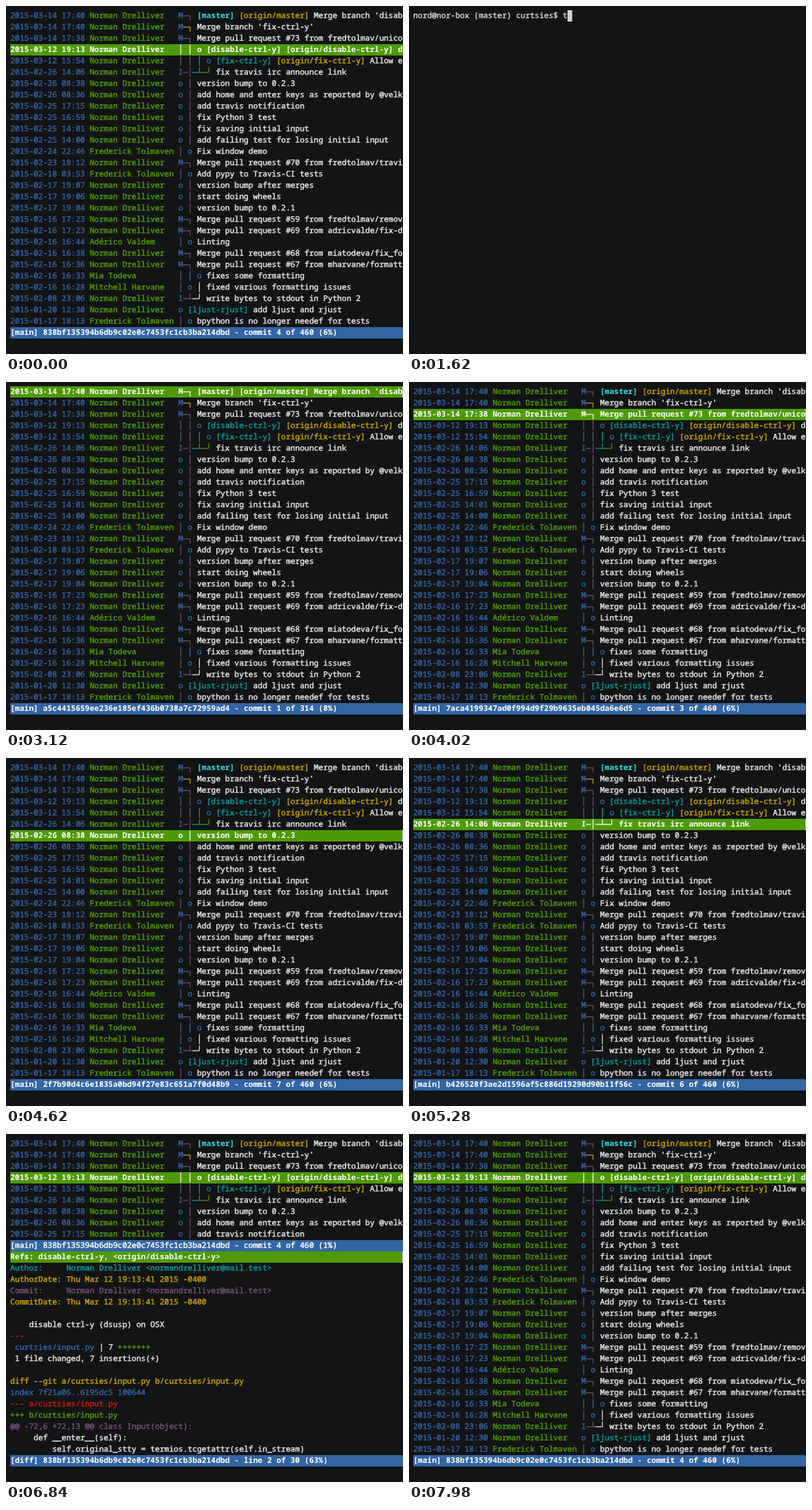
An HTML page for the animation above (8000 ms loop, 561 by 492 pixels).

```html
<!DOCTYPE html>
<html lang="en">
<head>
<meta charset="utf-8">
<title>Terminal log viewer</title>
<style>
  html, body { margin: 0; width: 561px; height: 492px; overflow: hidden; background: #121415; }
  svg { display: block; background: #121415; }
  text {
    font: 400 11px "Noto Sans Mono", "DejaVu Sans Mono", monospace;
    white-space: pre; text-rendering: geometricPrecision;
    fill: currentColor; stroke: currentColor; stroke-width: .45px;
  }
  text.bold { font-weight: 700; stroke: none; }
  path { fill: none; stroke: currentColor; stroke-width: 1.2px; }
</style>
</head>
<body>
<svg id="screen" width="561" height="492" viewBox="0 0 561 492"></svg>
<script>
const LOOP = 8000, CW = 6.6, RH = 16, LEFT = 6, TOP = 6, COLS = 84;
const COLOR = {
  b: '#3465a4', g: '#4e9a06', y: '#c9a100', c: '#06989a', m: '#75507b',
  r: '#cc1a0a', w: '#e6e6e4', W: '#ffffff', C: '#34e2e2', p: '#d3d3d0'
};

const ND = 'Norman Drelliver', FT = 'Frederick Tolmaven';
// date, author, graph, graph colours, subject
const LOG = [
  ['2015-03-14 17:40', ND, 'M─┐', 'bmm', "[master] [origin/master] Merge branch 'disable"],
  ['2015-03-14 17:40', ND, 'M─┐', 'byy', "Merge branch 'fix-ctrl-y'"],
  ['2015-03-14 17:38', ND, 'M─┐', 'bmm', 'Merge pull request #73 from fredtolmav/unico'],
  ['2015-03-12 19:13', ND, '│ │ o', 'm m b', '[disable-ctrl-y] [origin/disable-ctrl-y] d'],
  ['2015-03-12 15:54', ND, '│ │ │ o', 'm m c b', '[fix-ctrl-y] [origin/fix-ctrl-y] Allow e'],
  ['2015-02-26 14:06', ND, 'I─│─┴─┘', 'bmmccgg', 'fix travis irc announce link'],
  ['2015-02-26 08:38', ND, 'o │', 'b m', 'version bump to 0.2.3'],
  ['2015-02-26 08:36', ND, 'o │', 'b m', 'add home and enter keys as reported by @velk'],
  ['2015-02-25 17:15', ND, 'o │', 'b m', 'add travis notification'],
  ['2015-02-25 16:59', ND, 'o │', 'b m', 'fix Python 3 test'],
  ['2015-02-25 14:01', ND, 'o │', 'b m', 'fix saving initial input'],
  ['2015-02-25 14:00', ND, 'o │', 'b m', 'add failing test for losing initial input'],
  ['2015-02-24 22:46', FT, '│ o', 'm b', 'Fix window demo'],
  ['2015-02-23 18:12', ND, 'M─┐', 'bmm', 'Merge pull request #70 from fredtolmav/travi'],
  ['2015-02-18 03:53', FT, '│ o', 'm b', 'Add pypy to Travis-CI tests'],
  ['2015-02-17 19:07', ND, 'o │', 'b m', 'version bump after merges'],
  ['2015-02-17 19:06', ND, 'o │', 'b m', 'start doing wheels'],
  ['2015-02-17 19:04', ND, 'o │', 'b m', 'version bump to 0.2.1'],
  ['2015-02-16 17:23', ND, 'M─┐', 'bmm', 'Merge pull request #59 from fredtolmav/remov'],
  ['2015-02-16 17:23', ND, 'M─┐', 'bmm', 'Merge pull request #69 from adricvalde/fix-d'],
  ['2015-02-16 16:44', 'Adérico Valdem', '│ o', 'm b', 'Linting'],
  ['2015-02-16 16:38', ND, 'M─┐', 'bmm', 'Merge pull request #68 from miatodeva/fix_fo'],
  ['2015-02-16 16:36', ND, 'M─┐', 'bmm', 'Merge pull request #67 from mharvane/formatt'],
  ['2015-02-16 16:33', 'Mia Todeva', '│ │ o', 'm b b', 'fixes some formatting'],
  ['2015-02-16 16:28', 'Mitchell Harvane', '│ o │', 'm b w', 'fixed various formatting issues'],
  ['2015-02-08 23:06', ND, 'I─┴─┘', 'bmmww', 'write bytes to stdout in Python 2'],
  ['2015-01-20 12:30', ND, 'o', 'b', '[ljust-rjust] add ljust and rjust'],
  ['2015-01-17 18:13', FT, '│ o', 'm b', 'bpython is no longer needef for tests']
];

const HASH = [
  'a5c4415659ee236e185ef436b0738a7c72959ad4',
  '5d0e82b7c19f4a63e7d2086bb94f1c35a80e72d6',
  '7aca4199347ad0f994d9f29b9635eb045da6e6d5',
  '838bf135394b6db9c02e0c7453fc1cb3ba214dbd',
  'e19c04a7d3528fb60a4e97c12db5f8367049ca8e',
  'b426528f3ae2d1596af5c886d19290d90b11f56c',
  '2f7b90d4c6e1835a0bd94f27e83c651a7f0d48b9',
  'c60a3e95f1d7482b6e09d5a3187cf42b90e6d713'
];

const MAIL = ND + ' <normandrelliver@mail.test>';
// runs of colour, column, text
const DIFF = [
  [['W', 0, 'Refs: disable-ctrl-y, <origin/disable-ctrl-y>', true]],
  [['c', 0, 'Author:     ' + MAIL]],
  [['y', 0, 'AuthorDate: Thu Mar 12 19:13:41 2015 -0400']],
  [['m', 0, 'Commit:     ' + MAIL]],
  [['y', 0, 'CommitDate: Thu Mar 12 19:13:41 2015 -0400']],
  [],
  [['w', 4, 'disable ctrl-y (dsusp) on OSX']],
  [['r', 0, '---']],
  [['b', 1, 'curtsies/input.py'], ['w', 19, '| 7'], ['g', 23, '+++++++']],
  [['w', 1, '1 file changed, 7 insertions(+)']],
  [],
  [['y', 0, 'diff --git a/curtsies/input.py b/curtsies/input.py']],
  [['b', 0, 'index 7f21a06..6195dc5 100644']],
  [['r', 0, '--- a/curtsies/input.py']],
  [['g', 0, '+++ b/curtsies/input.py']],
  [['m', 0, '@@ -72,6 +72,13 @@ class Input(object):']],
  [['w', 5, 'def __enter__(self):']],
  [['w', 9, 'self.original_stty = termios.tcgetattr(self.in_stream)']]
];

const colX = col => LEFT + col * CW;
const rowY = row => TOP + row * RH;
const esc = s => s.replace(/&/g, '&amp;').replace(/</g, '&lt;');

function text(row, col, s, color, bold) {
  return `<text x="${colX(col).toFixed(1)}" y="${rowY(row) + 11}" color="${COLOR[color]}"` +
    `${bold ? ' class="bold"' : ''}>${esc(s.slice(0, COLS - col))}</text>`;
}

const bar = (row, color) =>
  `<rect x="${LEFT}" y="${rowY(row)}" width="555" height="${RH}" fill="${COLOR[color]}"/>`;

const block = (row, col) =>
  `<rect x="${Math.round(colX(col))}" y="${rowY(row)}" width="6.6" height="${RH}" fill="${COLOR.p}"/>`;

// Arms of each line-drawing character
const ARMS = { '│': 'NS', '─': 'EW', '┐': 'SW', '┘': 'NW', '┴': 'NEW' };

function line(row, col, ch, color) {
  const x = colX(col) + CW / 2, y = rowY(row) + 7.8;
  const end = { N: `V${y - 7.3}`, S: `V${y + 6.7}`, E: `H${colX(col + 1)}`, W: `H${colX(col)}` };
  const d = [...ARMS[ch]].map(arm => `M${x} ${y}${end[arm]}`).join('');
  return `<path d="${d}" color="${COLOR[color]}"/>`;
}

function commit(row, selected) {
  const [date, author, graph, tint, subject] = LOG[row];
  const pick = color => selected ? 'W' : color;
  let out = selected ? bar(row, 'g') : '';
  out += text(row, 0, date, pick('b'), selected) + text(row, 17, author, pick('g'), selected);
  [...graph].forEach((ch, i) => {
    if (ARMS[ch]) out += line(row, 36 + i, ch, pick(tint[i]));
    else if (ch !== ' ') out += text(row, 36 + i, ch, pick(tint[i]), selected);
  });
  let col = 37 + graph.length;
  for (const part of subject.split(/(\[[^\]]+\])/)) {
    const master = part === '[master]';
    const color = master ? 'C' : part.startsWith('[origin') ? 'y' : part[0] === '[' ? 'c' : 'w';
    const lead = part.length - part.trimStart().length;
    if (part.trim()) out += text(row, col + lead, part.trim(), pick(color), selected || master);
    col += part.length;
  }
  return out;
}

const status = (row, s, bold) => bar(row, 'b') + text(row, 0, s, 'W', bold);

function mainView(current, total, rows, focused) {
  let out = '';
  for (let i = 0; i < Math.min(rows, total); i++) out += commit(i, i === current - 1);
  const percent = Math.floor(rows * 100 / total);
  return out + status(rows, `[main] ${HASH[current - 1]} - commit ${current} of ${total} (${percent}%)`, focused);
}

function diffView(loaded) {
  let out = '';
  if (loaded) {
    out += bar(10, 'g');
    DIFF.forEach((runs, i) => {
      for (const [color, col, s, bold] of runs) out += text(10 + i, col, s, color, bold);
    });
  }
  return out + status(28, `[diff] ${HASH[3]}` + (loaded ? ' - line 2 of 30 (63%)' : ''), true);
}

function shell(typed, cursor, entered) {
  const s = 'nord@nor-box (master) curtsies$ ' + typed;
  return text(0, 0, s, 'p') + (cursor ? entered ? block(1, 0) : block(0, s.length) : '');
}

const MOVES = [[0, 1], [3780, 2], [4020, 3], [4140, 4], [4200, 5], [4260, 6], [4620, 7],
  [4800, 8], [5160, 7], [5280, 6], [5400, 5], [5520, 4]];
const KEYS = [[0, ''], [1620, 't'], [1740, 'ti'], [1920, 'tig']];
const BLINK = [[0, 1], [6420, 0], [6840, 1], [7320, 0], [7740, 1], [7920, 0]];
const at = (steps, t) => steps.filter(([start]) => start <= t).pop()[1];

// Commits read so far, refreshed every 60 ms
function loadedCount(t) {
  const late = Math.floor((t - 3120) / 60);
  return Math.min(460, Math.round(314 + late * (late < 0 ? 23.8 : 36.5)));
}

function draw(t) {
  if (t < 480) return mainView(4, 460, 28, true);
  if (t < 2220) return shell(at(KEYS, t), t < 1080 || t >= 1620);
  if (t < 2280) return shell('tig', true, true);
  if (t < 2400) return '';
  const current = at(MOVES, t), split = t >= 5940 && t < 7920;
  let out = mainView(current, loadedCount(t), split ? 9 : 28, !split);
  if (split) out += diffView(t >= 6000);
  if (at(BLINK, t)) out += block(split ? 10 : current - 1, COLS);
  return out;
}

const screen = document.getElementById('screen');
let shown = null;
function tick() {
  const t = performance.now() % LOOP, next = draw(t);
  if (next !== shown) screen.innerHTML = shown = next;
  requestAnimationFrame(tick);
}
tick();
</script>
</body>
</html>
```
